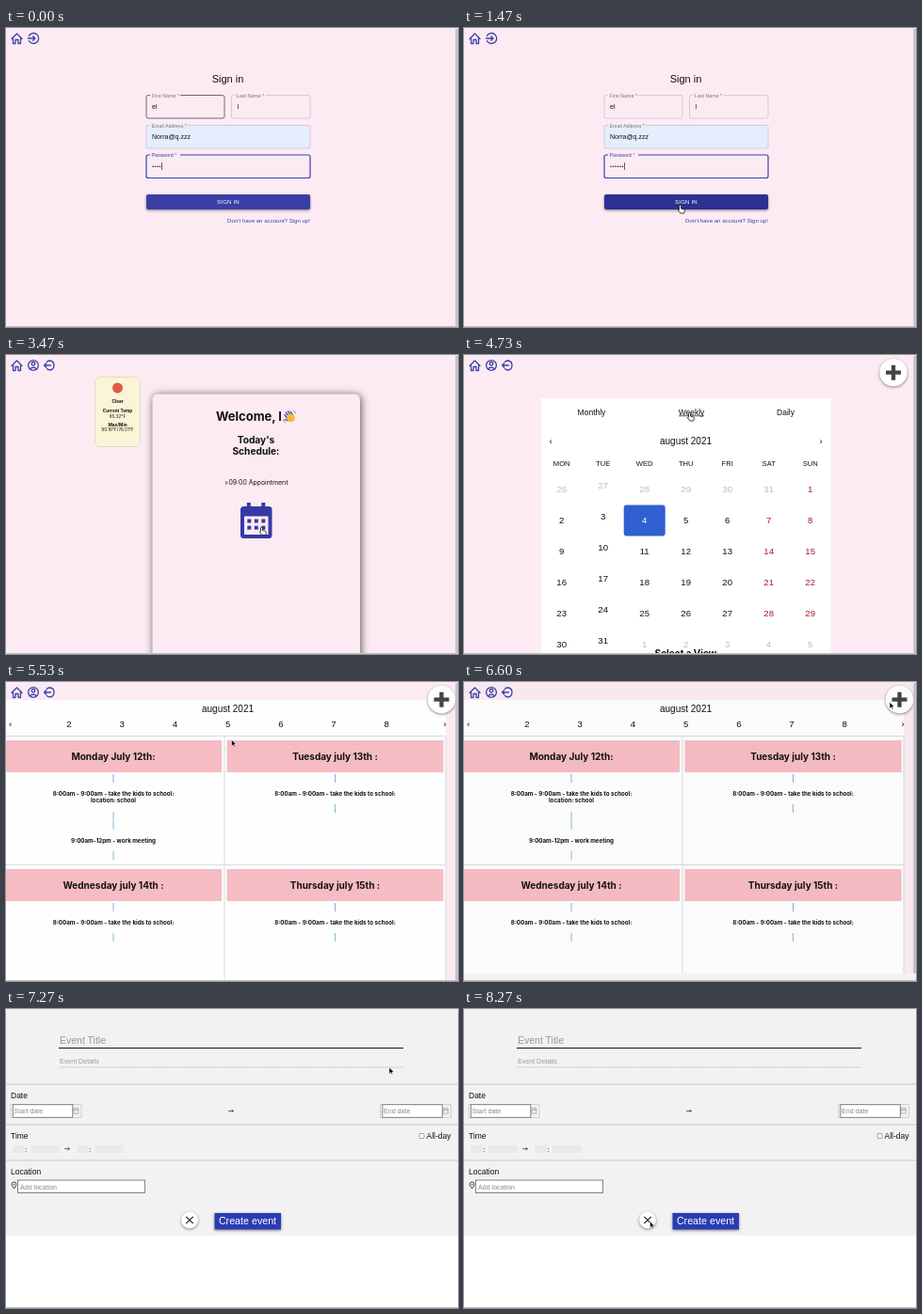
These frames come from a looping animation (480 px wide and 318 px high, 8470 ms). An HTML page:

```html
<!DOCTYPE html>
<html lang="en">
<head>
<meta charset="utf-8">
<title>Planner walkthrough</title>
<style>
html, body { margin: 0; width: 100%; height: 100%; overflow: hidden; background: #fcebf3; }
svg { display: block; width: 480px; height: 318px; font-family: "Liberation Sans", Arial, sans-serif; }
text { white-space: pre; }
.m { text-anchor: middle; }
.e { text-anchor: end; }
.i { font-family: Inter, sans-serif; }
.b { font-family: Inter, sans-serif; font-weight: 700; }
.line { fill: none; stroke: #3c41aa; stroke-width: 1.3; stroke-linejoin: round; stroke-linecap: round; }
.lift { filter: drop-shadow(0 1px 1.5px #0007); }
</style>
</head>
<body>
<svg id="stage" viewBox="0 0 480 318"></svg>
<script>
const LOOP = 8470;
const BLUE = '#3c41aa', PINK = '#fcebf3';
const stage = document.getElementById('stage');

const text = (x, y, size, str, cls = '', fill = '#111') =>
  `<text x="${x}" y="${y}" font-size="${size}" class="${cls}" fill="${fill}">${str}</text>`;
const rect = (x, y, w, h, fill, attrs = '') =>
  `<rect x="${x}" y="${y}" width="${w}" height="${h}" fill="${fill}" ${attrs}/>`;
const path = (d, attrs = 'class="line"') => `<path d="${d}" ${attrs}/>`;
const circle = (x, y, r, attrs) => `<circle cx="${x}" cy="${y}" r="${r}" ${attrs}/>`;
const group = (id, body, attrs = '') => `<g id="${id}" ${attrs}>${body}</g>`;
const range = n => [...Array(n).keys()];

// Navigation icons
const home = path('M6 11.5L11.5 6l5.500 5.500M7.500 10.500V16.500H10V12.500H13V16.500H15.500V10.500');
const loginIcon = path('M24.300 8.500A5.500 5.500 0 1 1 24.300 13.500M23.500 11H31M28.700 8.700L31 11L28.700 13.300');
const memberIcons = home
  + circle(29, 11, 5.4, 'class="line"') + circle(29, 9.3, 1.8, 'class="line"')
  + path('M25.300 14.800Q29 11.600 32.700 14.800')
  + path('M43.500 7.300Q45 6 47 6Q51 6.800 51 11Q51 15.200 47 16Q45 16 43.500 14.700M47.500 11H40.500M42.700 8.800L40.500 11L42.700 13.200');

// Sign-in page
const field = (id, x, y, w, label, gap, opts = {}) =>
  rect(x, y, w, 24.5, opts.fill || 'none', `id="${id}" rx="2" stroke="${opts.stroke || '#c9bcc4'}" stroke-width="${opts.weight || .7}"`)
  + rect(x + 4, y - 1, gap, 2, PINK)
  + text(x + 5.5, y + 2, 5.3, `${label}<tspan fill="#d0505c"> *</tspan>`, '', opts.stroke || '#777');

const signIn = home + loginIcon
  + text(235.5, 58, 11, 'Sign in', 'm')
  + field('first', 149, 71.5, 83, 'First Name', 32)
  + field('last', 239.5, 71.5, 83.5, 'Last Name', 32)
  + field('email', 149, 103.500, 174, 'Email Address', 40, { fill: '#e4eefc' })
  + field('pass', 149, 135, 174, 'Password', 32, { stroke: BLUE, weight: 1.2 })
  + text(155, 86.3, 7, 'el') + text(245.5, 86.3, 7, 'l')
  + text(155, 118, 7, 'Norra@q.zzz')
  + group('dots', range(6).map(i => circle(156 + i * 2.5, 147.200, .8, 'fill="#222"')).join(''))
  + rect(0, 143, .7, 8, '#222', 'id="caret"')
  + rect(149, 177, 174, 16, '#3a3fa8', 'id="submit" rx="2" class="lift"')
  + text(236, 187.2, 6.1, 'SIGN IN', 'm" letter-spacing=".17', '#fff')
  + text(323, 206.500, 6.1, "Don't have an account? Sign up!", 'e', BLUE);

// Welcome page
const weather = rect(94.5, 23.5, 48, 74, '#fbf5d7', 'rx="5" stroke="#dcd6bf" stroke-width=".8"')
  + circle(118.5, 35, 5.5, 'fill="#e05a48"')
  + [['Clear', 51, 'b'], ['Current Temp', 61, 'b'], ['85.32°F', 66.5, 'i'], ['Max/Min', 76, 'b'], ['90.16°F/76.01°F', 81, 'i']]
    .map(([s, y, c]) => text(118.5, y, 4.7, s, 'm ' + c)).join('');

const wave = `<g transform="translate(301 65.500) rotate(-35)" stroke="#f5b83d" stroke-width="2.5" stroke-linecap="round">`
  + path('M-3 0V-4.500M-.5 0V-6M2 0V-5.500M4 1V-3.500M-3 3L-6 0')
  + `<ellipse cx=".5" cy="2" rx="4.3" ry="4.500" fill="#f5b83d" stroke="none"/></g>`
  + path('M294 68Q294.500 71 297 72M305 59Q307.500 60 308 62.500', 'fill="none" stroke="#8d7b60" stroke-width=".7"');

const calendarIcon = rect(249, 161, 33.500, 34, '#343aa5', 'rx="3.5"')
  + rect(255.8, 157, 4, 7, '#343aa5') + rect(271.300, 157, 4, 7, '#343aa5')
  + rect(253, 171.500, 25.500, 19.500, PINK)
  + range(6).map(i => rect(256.300 + i % 3 * 7.500, 174.500 + (i > 2) * 7.200, 4, 4, '#343aa5')).join('');

const welcome = memberIcons
  + rect(155.500, 41.500, 220.500, 300, PINK, 'rx="6" style="filter:drop-shadow(1px 1px 4px #000a)"')
  + text(223, 70, 13, 'Welcome, l', 'b') + wave
  + text(265.500, 94, 10.2, "Today's", 'm b') + text(265.500, 106.300, 10.2, 'Schedule:', 'm b')
  + calendarIcon
  + group('loaded', weather + path('M233.300 134.300L235.800 136L233.300 137.700Z', 'fill="none" stroke="#222" stroke-width=".5"')
    + text(236.500, 138.300, 6.9, '09:00 Appointment', 'i'));

// Monthly calendar
const days = range(42).map(i => {
  const col = i % 7, day = i - 5;
  const out = day < 1 || day > 31;
  const shown = day < 1 ? day + 31 : day > 31 ? day - 31 : day;
  const fill = out ? '#bdbdbd' : day === 4 ? '#fff' : col > 4 ? '#a8182a' : '#111';
  return text(103.700 + col * 44, 146 + Math.floor(i / 7) * 33 - (col === 1 ? 4 : 0), 9.6, shown, 'm', fill);
}).join('');

const plus = x => circle(x, 18.700, 14.7, 'fill="#fff" class="lift"')
  + path(`M${x - 8} 18.700H${x + 8}M${x} 10.700V26.700`, 'stroke="#444" stroke-width="4.300"');

const month = memberIcons + plus(456)
  + rect(82, 46, 307.500, 272, '#fff')
  + text(135.500, 63.500, 8.5, 'Monthly', 'm') + text(241.500, 63.500, 8.5, 'Weekly', 'm') + text(341.500, 63.500, 8.5, 'Daily', 'm')
  + rect(228, 64.500, 27, .7, '#111', 'id="underline"')
  + text(235.500, 94.500, 10, 'august 2021', 'm') + text(92, 94.500, 9.5, '‹', 'm') + text(379, 94.500, 9.5, '›', 'm')
  + ['MON', 'TUE', 'WED', 'THU', 'FRI', 'SAT', 'SUN'].map((d, i) => text(103.700 + i * 44, 118, 7.6, d, 'm')).join('')
  + rect(169.700, 159.500, 44, 33, '#3160d2', 'rx="3"') + days
  + text(235.500, 321, 10, 'Select a View', 'm b');

// Weekly calendar
const tick = (x, y, fill) => rect(x - .5, y, 1, 9, fill);
const dayCell = (x, y, title, items) => rect(x, y, 230, 34, '#f6bcc4')
  + text(x + 115, y + 21.2, 10, title, 'm b')
  + items.map(([dy, lines, end]) => tick(x + 115, y + dy - 23, '#8eabe4')
    + lines.map((s, i) => text(x + 115, y + dy + i * 7.200, 6.2, s, 'm b')).join('')
    + tick(x + 115, y + end, '#80c2b4')).join('');
const school = '8:00am - 9:00am - take the kids to school:';
const single = [[59, [school], 68]];

const week = memberIcons
  + rect(0, 19, 467, 299, '#fdfefd')
  + path('M0 57.500H467M0 194.500H467M232 57V318M467 57V318', 'stroke="#d3d9df" stroke-width=".9"')
  + text(235.500, 32, 10, 'august 2021', 'm')
  + range(7).map(i => text(67 + i * 56.200, 47.500, 9.6, i + 2, 'm')).join('')
  + text(4.500, 47.500, 9.5, '‹', 'm') + text(466, 47.500, 9.5, '›', 'm')
  + dayCell(-1, 62, 'Monday July 12th:', [[59, [school, 'location: school'], 76], [108.500, ['9:00am-12pm - work meeting'], 118]])
  + dayCell(234.500, 62, 'Tuesday july 13th :', single)
  + dayCell(-1, 199, 'Wednesday july 14th :', single)
  + dayCell(234.500, 199, 'Thursday july 15th :', single)
  + plus(462.500);

// Event form
const rule = y => rect(0, y, 480, 1, '#c9c9c9');
const dateBox = (x, label) => rect(x, 101.500, 75, 14, 'none', 'stroke="#c8c8c8" stroke-width=".8"')
  + rect(x + 2.300, 101.700, 63.500, 13.600, '#fff', 'stroke="#777" stroke-width=".9"')
  + text(x + 3.500, 111, 7.1, label, '', '#888')
  + path(`M${x + 66.800} 105.800h5v5.400h-5zM${x + 66.800} 107.500h5M${x + 68} 104.800v1M${x + 70.600} 104.800v1`, 'fill="none" stroke="#999" stroke-width=".7"');
const arrowRight = (x, y) => path(`M${x - 2.800} ${y}h5.200m-1.700 -1.500l1.700 1.500l-1.700 1.500`, 'fill="none" stroke="#333" stroke-width=".8"');
const timeBox = x => rect(x, 145, 13, 8, '#e9e9e9') + text(x + 13.500, 151.500, 8, ':')
  + rect(x + 19, 145, 31, 8, '#eaeaea');

const form = rect(0, 0, 480, 360, '#fff') + rect(0, 0, 480, 241, '#f2f2f2')
  + text(57, 36.500, 10.5, 'Event Title', '', '#999') + rect(56, 41, 366, 1.100, '#222')
  + text(57, 58, 7.1, 'Event Details', '', '#999')
  + path('M56 62H422', 'stroke="#aaa" stroke-width=".8" stroke-dasharray="1 .8"')
  + rule(79.500) + text(5, 95.300, 8.5, 'Date') + dateBox(5, 'Start date') + dateBox(397.500, 'End date') + arrowRight(239, 108.500)
  + rule(122.500) + text(5, 138, 8.5, 'Time') + timeBox(7) + timeBox(75) + arrowRight(65, 148.700)
  + rect(439, 132.500, 5, 5, '#fff', 'rx=".8" stroke="#777" stroke-width=".7"') + text(446.500, 138, 8.5, 'All-day')
  + rule(160.500) + text(5, 175.800, 8.5, 'Location')
  + path('M8.500 191Q5.800 187.500 6 186.500A2.500 2.500 0 0 1 11 186.500Q11.200 187.500 8.500 191Z', 'fill="none" stroke="#333" stroke-width=".9"')
  + circle(8.500, 186.700, .8, 'fill="#333"')
  + rect(12.500, 182, 135, 13.500, '#fff', 'stroke="#777" stroke-width=".9"') + text(15, 191.500, 7.1, 'Add location', '', '#888')
  + circle(195, 224.500, 9, 'fill="#fff" class="lift"')
  + path('M191.300 220.800L198.700 228.200M198.700 220.800L191.300 228.200', 'stroke="#222" stroke-width="1.200"')
  + rect(221.500, 217, 70.500, 17.500, '#2a3cb4', 'class="lift"') + text(256.500, 229.300, 10.7, 'Create event', 'm', '#fff');

stage.innerHTML = rect(0, 0, 480, 318, PINK)
  + group('signIn', signIn) + group('welcome', welcome) + group('month', month) + group('week', week)
  + rect(477.200, 1, 2.800, 317, '#c8c2c6')
  + rect(0, 0, 480, 318, '#000', 'id="shade"')
  + group('form', form)
  + rect(0, 317, 480, 1, '#c4c0c2')
  + group('cursor',
    path('M0 0v6.800l1.600-1.500 1.100 2.300 1.100-.5-1.100-2.300h2.200z', 'id="arrow" fill="#000" stroke="#fff" stroke-width=".5"')
    + path('M0 0q1 0 1 1v2.600l3 .7q1 .3 .9 1.400l-.7 2.800h-3.800l-2.400-2.900q-.4-1.200 1-.8V1q0-1 1-1z', 'id="hand" fill="#fff" stroke="#111" stroke-width=".8"'));

const el = id => document.getElementById(id);
const show = (id, on) => el(id).setAttribute('display', on ? 'inline' : 'none');

// Pointer stops: time, x, y
const stops = [
  [0, 190, 84], [800, 190, 84], [1430, 229.500, 188.500], [2670, 229.500, 188.500], [3130, 289, 181],
  [3330, 289, 181], [3470, 271.500, 183], [4200, 271.500, 183], [4400, 286, 130], [4700, 239.500, 61.500],
  [5530, 239.500, 61.500], [6270, 452, 21.500], [7130, 452, 21.500], [7330, 395, 73], [7440, 395, 73],
  [8240, 197.500, 226], [LOOP, 197.500, 226]
];
function pointer(t) {
  const i = stops.findIndex(s => s[0] > t);
  const [t0, x0, y0] = stops[i - 1], [t1, x1, y1] = stops[i];
  const p = (t - t0) / (t1 - t0), k = p * p * (3 - 2 * p);
  return [x0 + (x1 - x0) * k, y0 + (y1 - y0) * k];
}

// cubic-bezier(0, 0, .2, 1)
function easeOut(p) {
  if (p <= 0 || p >= 1) return p <= 0 ? 0 : 1;
  let lo = 0, hi = 1;
  for (let i = 0; i < 20; i++) {
    const u = (lo + hi) / 2;
    if (.6 * u * u + .4 * u ** 3 < p) lo = u; else hi = u;
  }
  return lo * lo * (3 - 2 * lo);
}

function draw(t) {
  const scene = t < 1740 ? 'signIn' : t < 3730 ? 'welcome' : t < 5000 ? 'month' : 'week';
  for (const id of ['signIn', 'welcome', 'month', 'week']) show(id, id === scene);

  const [x, y] = pointer(t);
  const inRow = (top, h) => y > top && y < top + h;
  const over = { first: inRow(71, 25), email: inRow(103, 25) };
  for (const id in over) el(id).setAttribute('stroke', over[id] ? '#333' : '#c9bcc4');
  el('submit').setAttribute('fill', inRow(177, 16) ? '#2b3093' : '#3a3fa8');

  const count = 4 + (t >= 270) + (t >= 330);
  [...el('dots').children].forEach((dot, i) => dot.setAttribute('opacity', +(i < count)));
  el('caret').setAttribute('x', 154.800 + count * 2.550);

  show('loaded', t >= 2060);
  show('underline', Math.abs(x - 241) < 15 && y < 66);

  const slide = easeOut((t - 6600) / 184);
  show('form', slide > 0);
  el('form').setAttribute('transform', `translate(0 ${318 * (1 - slide)})`);
  el('shade').setAttribute('opacity', .42 * slide);

  const hand = scene === 'month' || scene === 'signIn' && y > 177
    || scene === 'welcome' && (t < 2400 || x > 249 && x < 283 && y > 157);
  show('cursor', t >= 800);
  show('hand', hand);
  show('arrow', !hand);
  el('cursor').setAttribute('transform', `translate(${x} ${y})`);
}

const start = performance.now();
function tickFrame() {
  draw((performance.now() - start) % LOOP);
  requestAnimationFrame(tickFrame);
}
tickFrame();
</script>
</body>
</html>
```
